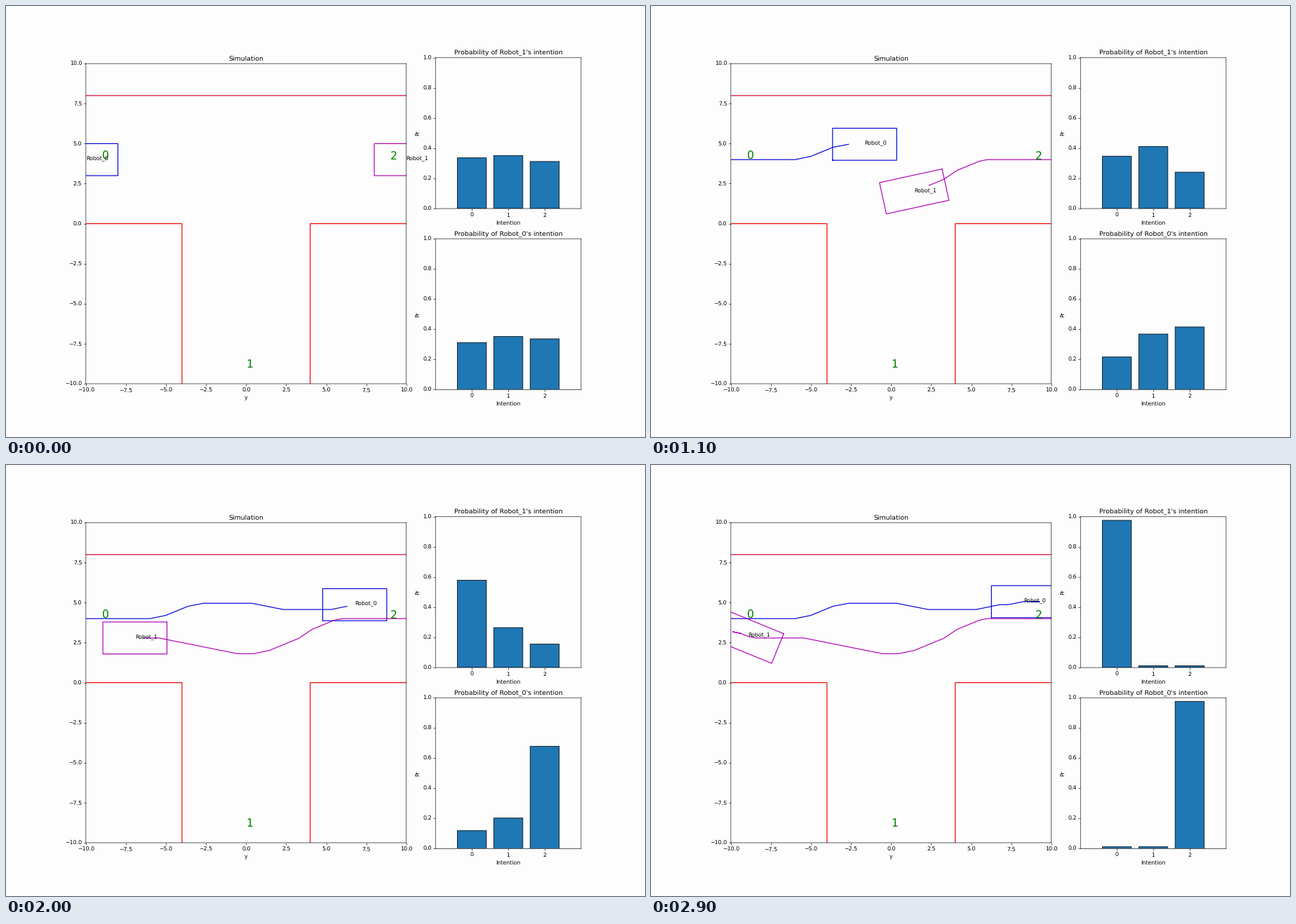
A matplotlib script for the animation above (3 s loop, 911 by 615 pixels).

```python
import numpy as np
import matplotlib.pyplot as plt
from matplotlib.animation import FuncAnimation

W, H, DPI = 911, 615, 56.4
FRAMES, INTERVAL = 30, 100
BG = "#fdfdfd"
RED, CRIMSON, BLUE, PURPLE = "#ee0000", "#d40028", "#0000dc", "#b000b4"

plt.rcParams.update({"font.family": "DejaVu Sans", "text.hinting": "none",
                     "path.snap": False})


def travelled(go, stop):
    """Distance per frame: cruise twice, creep in between, stop, then back up."""
    t = np.arange(FRAMES - 1)
    cruising = ((t >= 1) & (t < 4)) | ((t >= go) & (t < 19))
    speed = np.where(cruising, 1.0, 0.5)
    speed[stop:27] = 0
    speed[27:] = -0.5
    return np.concatenate([[0], np.cumsum(speed)])


def along(points, dist):
    """Positions at the given distances along a polyline."""
    steps = np.hypot(*np.diff(points, axis=0).T)
    length = np.concatenate([[0], np.cumsum(steps)])
    return np.column_stack([np.interp(dist, length, c) for c in points.T])


def shares(goal, drift, scale, power):
    """Log-odds of the true goal grow with time; the rest is split in two."""
    t = np.arange(FRAMES)
    odds = -0.68 + drift * t + (t / scale) ** power
    sure = np.minimum(1 / (1 + np.exp(-odds)), 0.976)
    split = np.interp(t, [4, 9, 24, 29], [0.53, 0.63, 0.63, 0.5])
    middle = (1 - sure) * split
    other = 1 - sure - middle
    return np.column_stack([sure, middle, other] if goal == 0 else [other, middle, sure])


class Robot:
    CORNERS = np.array([[-2, -1], [2, -1], [2, 1], [-2, 1], [-2, -1]])

    def __init__(self, ax, name, color, points, go, stop):
        points = np.array(points, float)
        dist = travelled(go, stop)
        self.path = along(points, dist)
        ahead = along(points, dist + 0.05) - self.path
        self.heading = np.arctan2(ahead[:, 1], ahead[:, 0])
        self.trail, = ax.plot([], [], color=color)
        self.body, = ax.plot([], [], color=color)
        self.label = ax.text(0, 0, name, zorder=5)

    def show(self, i):
        c, s = np.cos(self.heading[i]), np.sin(self.heading[i])
        corners = self.CORNERS @ np.array([[c, s], [-s, c]]) + self.path[i]
        self.body.set_data(*corners.T)
        self.trail.set_data(*self.path[:i].T)
        self.label.set_position(self.path[i])


def bar_panel(row, name):
    ax = plt.subplot2grid((2, 3), (row, 2), facecolor=BG)
    ax.set(xlim=(-1, 3), ylim=(0, 1), xticks=[0, 1, 2], xlabel="Intention",
           ylabel="Pr", title=f"Probability of {name}'s intention")
    return ax.bar([0, 1, 2], [0, 0, 0], color="C0", edgecolor="black")


fig = plt.figure(figsize=((W + 1e-6) / DPI, (H + 1e-6) / DPI), dpi=DPI, facecolor=BG)

sim = plt.subplot2grid((2, 3), (0, 0), rowspan=2, colspan=2, facecolor=BG)
sim.set_aspect("equal")
ticks = np.arange(-10, 10.1, 2.5)
sim.set(xlim=(-10, 10), ylim=(-10, 10), xticks=ticks, yticks=ticks,
        xlabel="y", title="Simulation")

sim.plot([-10, 10], [8, 8], color=CRIMSON)
for side in (-1, 1):
    sim.plot([side * 10, side * 4, side * 4], [0, 0, -10], color=RED)
for goal, spot in enumerate([(-9, 4), (0, -9), (9, 4)]):
    sim.text(*spot, str(goal), color="green", fontsize=20)

robots = [
    Robot(sim, "Robot_0", BLUE,
          [(-10, 4), (-6, 4), (-5.02, 4.2), (-3.63, 4.77), (-2.65, 4.96),
           (.35, 4.96), (2.31, 4.57), (5.31, 4.57), (6.78, 4.87), (7.28, 4.87),
           (8.26, 5.06), (10, 5.06)], go=8, stop=25),
    Robot(sim, "Robot_1", PURPLE,
          [(10, 4), (6, 4), (5.51, 3.9), (4.12, 3.33), (3.29, 2.77),
           (1.44, 2.01), (.46, 1.81), (-.54, 1.81), (-5.44, 2.79), (-8.44, 2.79),
           (-8.93, 2.89), (-9.39, 3.08), (-11, 3.4)], go=7, stop=26),
]
panels = [
    (bar_panel(0, "Robot_1"), shares(goal=0, drift=0, scale=20, power=5)),
    (bar_panel(1, "Robot_0"), shares(goal=2, drift=0.03, scale=20.5, power=7.7)),
]


def update(i):
    for robot in robots:
        robot.show(i)
    for bars, probs in panels:
        for bar, p in zip(bars, probs[i]):
            bar.set_height(p)
    return []


anim = FuncAnimation(fig, update, frames=FRAMES, interval=INTERVAL,
                     repeat=True, repeat_delay=0, blit=False)
plt.show()
```
